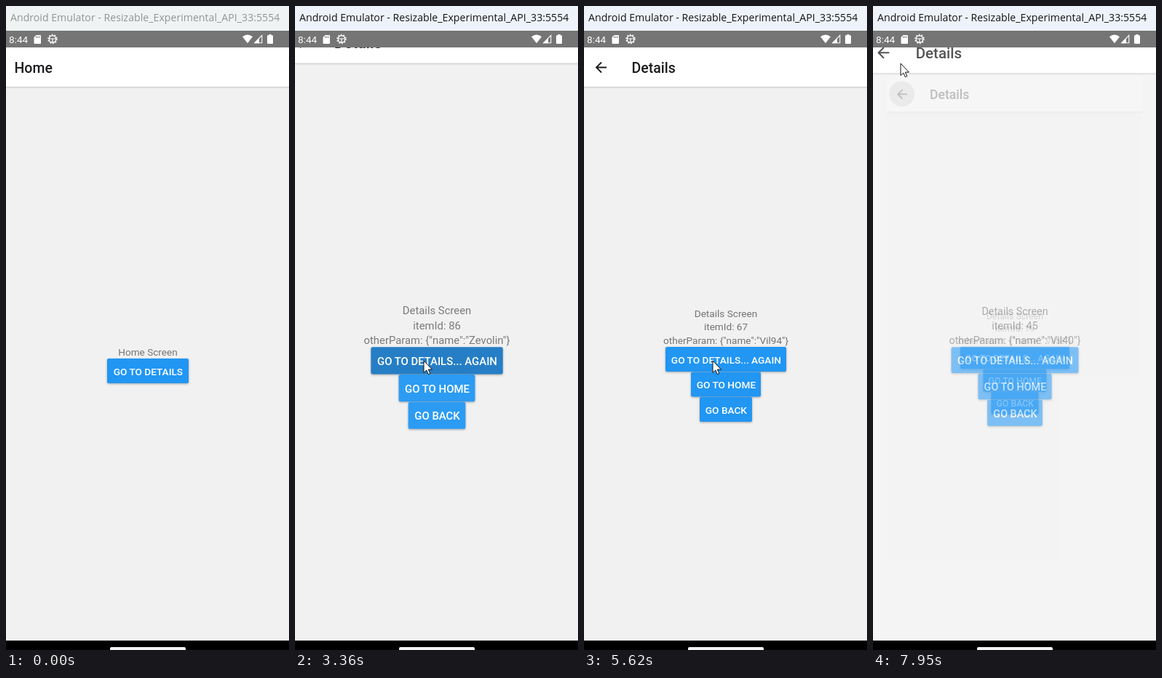
An HTML page for the animation above (8 s loop, 389 by 886 pixels).

```html
<!DOCTYPE html>
<html lang="en">
<head>
<meta charset="utf-8">
<title>Stack navigation</title>
<style>
  html, body { margin: 0; width: 100%; height: 100%; overflow: hidden; background: #000; }
  svg { display: block; width: 389px; height: 886px; font-family: Roboto, sans-serif; }
  #title { font: 14.15px "Open Sans", sans-serif; }
  .heading { font-size: 19.5px; font-weight: 500; fill: #1c1c1e; }
  .body { font-size: 13.6px; fill: #737373; text-anchor: middle; }
  .label { font-size: 13.65px; font-weight: 500; fill: #fff; text-anchor: middle; }
  .button { fill: #2196f3; filter: drop-shadow(0 1px 1.5px rgba(0, 0, 0, .32)); }
</style>
</head>
<body>
<svg viewBox="0 0 389 886">
  <defs>
    <clipPath id="content"><rect y="57" width="389" height="816"/></clipPath>
    <linearGradient id="shade" x2="0" y2="1">
      <stop stop-opacity=".14"/><stop offset="1" stop-opacity="0"/>
    </linearGradient>
    <radialGradient id="ripple" gradientUnits="userSpaceOnUse" cx="195">
      <stop offset=".5" stop-opacity=".2"/><stop offset="1" stop-opacity="0"/>
    </radialGradient>
  </defs>
  <rect id="titleBar" width="389" height="34"/>
  <text id="title" x="6" y="21">Android Emulator - Resizable_Experimental_API_33:5554</text>

  <g clip-path="url(#content)">
    <rect y="57" width="389" height="816" fill="#fff"/>
    <g id="screens"></g>
  </g>

  <rect y="34" width="389" height="23" fill="#757575"/>
  <g fill="#fff">
    <text x="4" y="51" font-size="13.6">8:44</text>
    <path d="M41.5 40H47a1 1 0 0 1 1 1V51a1 1 0 0 1-1 1H39.5a1 1 0 0 1-1-1V43z"/>
    <path d="M41.5 41.5v2.5M43.7 41.5v2.5M45.9 41.5v2.5" stroke="#757575"/>
    <g fill="none" stroke="#fff">
      <circle cx="64" cy="45.5" r="4.8" stroke-width="1.4"/>
      <circle cx="64" cy="45.5" r="6.1" stroke-width="1.5" stroke-dasharray="1.6 2.23"/>
      <path d="M59.5 45H68.5M64 45.5V50" stroke-width="1.2"/>
    </g>
    <path d="M325 42.3Q332 36.5 339 42.3L332 51.3z"/>
    <path d="M341.8 50.8H351.8V40.3z" fill="none" stroke="#fff" stroke-width="1.1"/>
    <path d="M341 51.3H348V44z"/>
    <path d="M361.3 39h3.4v1.3H366a1 1 0 0 1 1 1V51a1 1 0 0 1-1 1H360a1 1 0 0 1-1-1V41.3a1 1 0 0 1 1-1h1.3z"/>
  </g>
  <rect y="873" width="389" height="13" fill="#000"/>
  <rect x="143" y="882" width="104" height="8" rx="2" fill="#f4f4f4"/>
  <path id="cursor" d="M0 0V16.5L3.8 13L6.3 18.7L8.8 17.6L6.3 12.1H11.5z" fill="#fff" stroke="#111"/>
</svg>

<script>
const LOOP = 8000, STEP = 70, SETTLE = 215;
const $ = id => document.getElementById(id);
const clamp = v => Math.min(1, Math.max(0, v));
const ramp = (t, a, b) => clamp((t - a) / (b - a));
const mix = (a, b, p) => a + (b - a) * p;

// Screen construction
const bodyText = (str, y) => `<text class="body" x="195" y="${y}">${str}</text>`;
const button = (str, y, w) => `<rect class="button" x="${195 - w / 2}" y="${y}" width="${w}" height="34" rx="2"/>
  <rect class="ripple" x="${195 - w / 2}" y="${y}" width="${w}" height="34" rx="2" fill="url(#ripple)" display="none"/>
  <text class="label" x="195.4" y="${y + 22.5}">${str}</text>`;
const screen = (title, x, content) => `<g class="screen">
  <rect y="57" width="389" height="816" fill="#f1f1f1"/>
  <rect y="57" width="389" height="54" fill="#fff"/>
  <rect y="111" width="389" height="3" fill="url(#shade)"/>
  <text class="heading" x="${x}" y="92">${title}</text>${content}</g>`;
const backArrow = `<circle class="halo" cx="23" cy="84" fill-opacity=".2"/>
  <path transform="translate(11.8 73) scale(.96)" fill="#1c1c1e"
    d="M20 11H7.83l5.59-5.59L12 4l-8 8 8 8 1.41-1.41L7.83 13H20z"/>`;
const details = (id, name) => screen('Details', 65.5, backArrow
  + bodyText('Details Screen', 427.5)
  + bodyText('itemId: ' + id, 446.3)
  + bodyText(`otherParam: {"name":"${name}"}`, 465.2)
  + button('GO TO DETAILS... AGAIN', 469, 166)
  + button('GO TO HOME', 503.5, 96)
  + button('GO BACK', 538, 72));

$('screens').innerHTML =
  screen('Home', 11.5, bodyText('Home Screen', 480.8) + button('GO TO DETAILS', 485, 112))
  + details(86, 'Zevolin') + details(45, 'Vil40') + details(19, 'Vil58') + details(67, 'Vil94');
const screens = [...document.querySelectorAll('.screen')];

// Timeline
const bursts = [0, 630, 1450, 2410, 3230, 3890, 4920, 5820, 6440, 7270, 7740, 7950];
const moves = [
  { at: 1700, from: 0, to: 1 }, { at: 3292, from: 1, to: 2 }, { at: 4403, from: 2, to: 3 },
  { at: 5400, from: 3, to: 4 }, { at: 6780, from: 4, to: 3 }, { at: 7869, from: 3, to: 2 },
];
const presses = [
  { at: 1380, end: 1910, screen: 0, button: 0 }, { at: 2710, end: 3500, screen: 1, button: 0 },
  { at: 3910, end: 4610, screen: 2, button: 0 }, { at: 4920, end: 5610, screen: 3, button: 0 },
  { at: 6440, end: 6990, screen: 4, button: 2 },
];
const pointer = [
  [630, 360, 240], [1330, 161, 486], [2410, 161, 486], [2690, 177, 488],
  [5820, 177, 488], [6100, 199, 584], [6300, 198, 552], [6860, 198, 552],
  [7200, 52, 106], [7410, 23, 62], [7550, 38, 79],
];

// Fast-out, extra-slow-in: two joined cubic Béziers
const curves = [[0, 0, .05, 0, .1333, .06, .1667, .4], [.1667, .4, .2083, .82, .25, 1, 1, 1]];
function ease(x) {
  const c = curves[x < .1667 ? 0 : 1];
  const at = (u, k) => (1 - u) ** 3 * c[k] + 3 * u * (1 - u) ** 2 * c[k + 2]
    + 3 * u * u * (1 - u) * c[k + 4] + u ** 3 * c[k + 6];
  let lo = 0, hi = 1;
  for (let i = 0; i < 24; i++) {
    const mid = (lo + hi) / 2;
    if (at(mid, 0) < x) lo = mid; else hi = mid;
  }
  return at(lo, 1);
}

function place(index, scale, opacity) {
  const el = screens[index];
  el.removeAttribute('display');
  el.setAttribute('transform', `translate(194.5 465) scale(${scale}) translate(-194.5 -465)`);
  el.setAttribute('opacity', opacity);
}

function drawScreens(t) {
  screens.forEach(el => el.setAttribute('display', 'none'));
  const move = moves.findLast(m => m.at <= t);
  if (!move) return place(0, 1, 1);
  const age = t - move.at;
  if (age >= SETTLE) return place(move.to, 1, 1);
  const p = ease(age / 400);
  if (move.to > move.from) {
    place(move.from, 1 + .15 * p, 1 - .3 * ramp(age, 65, 140));
    place(move.to, .85 + .15 * p, ramp(age, 79, 130));
  } else {
    place(move.from, 1 - .15 * p, 1 - ramp(age, 35, 96));
    place(move.to, 1.15 - .15 * p, ramp(age, 20, 101));
  }
}

function drawPresses(t) {
  document.querySelectorAll('.ripple').forEach(el => el.setAttribute('display', 'none'));
  const press = presses.find(p => t >= p.at && t < p.end);
  if (press) {
    const el = screens[press.screen].querySelectorAll('.ripple')[press.button];
    const width = +el.getAttribute('width');
    el.removeAttribute('display');
    el.setAttribute('opacity', ramp(t, press.at - 40, press.at + 75));
    $('ripple').setAttribute('cy', +el.getAttribute('y') + 17);
    $('ripple').setAttribute('r', width * (.2 + .85 * ramp(t, press.at, press.at + 450)));
  }
  const halo = t < 7740 ? 0 : mix(13, 19.3, ramp(t, 7740, 7810));
  document.querySelectorAll('.halo').forEach((el, i) => el.setAttribute('r', i === 2 ? halo : 0));
}

function drawPointer(t) {
  $('cursor').setAttribute('display', t < pointer[0][0] ? 'none' : 'inline');
  const i = Math.max(0, pointer.findLastIndex(k => k[0] <= t));
  const a = pointer[i], b = pointer[i + 1] || a;
  const p = a === b ? 0 : ramp(t, a[0], b[0]);
  const s = p * p * (3 - 2 * p);
  $('cursor').setAttribute('transform', `translate(${mix(a[1], b[1], s)} ${mix(a[2], b[2], s)})`);
}

function draw(now) {
  // The picture advances in even steps within each burst of activity
  const time = now % LOOP;
  const start = bursts.findLast(b => b <= time);
  const t = start + Math.floor((time - start + 10) / STEP) * STEP;
  const active = t >= 1390;
  $('titleBar').setAttribute('fill', active ? '#eef3fb' : '#f0f3f4');
  $('title').setAttribute('fill', active ? '#151515' : '#949494');
  drawScreens(t);
  drawPresses(t);
  drawPointer(t);
}

function tick() {
  draw(performance.now());
  requestAnimationFrame(tick);
}
tick();
</script>
</body>
</html>
```
